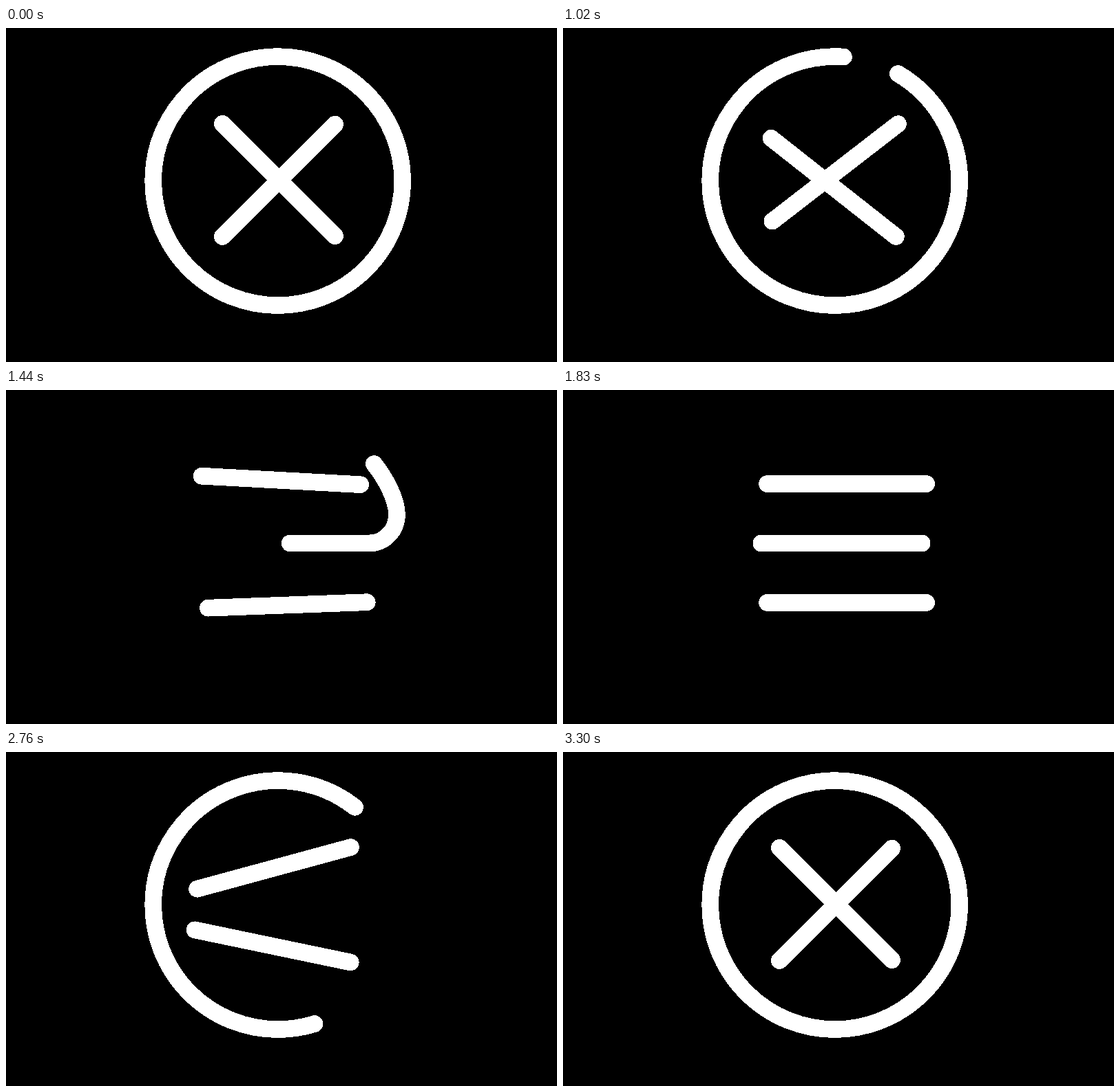
An HTML page without scripts that plays this animation: 800x486 px, repeating every 3.75 s.

```html
<!DOCTYPE html>
<html lang="en">
<head>
<meta charset="utf-8">
<title>Menu and close button</title>
<style>
  /* Both ends of the visible stroke, measured along the outline path. */
  @property --head { syntax: "<length>"; inherits: false; initial-value: 1710px; }
  @property --tail { syntax: "<length>"; inherits: false; initial-value: 571px; }

  html, body { margin: 0; width: 100%; height: 100%; overflow: hidden; background: #000; }
  svg { display: block; width: 100vw; height: 100vh; }
  path {
    fill: none;
    stroke: #fff;
    stroke-width: 24.7px;
    stroke-linecap: round;
    shape-rendering: crispEdges;
  }

  /* Opening is closing played backwards, so one half-loop alternates. */
  .outline, .bar {
    animation-duration: 1875ms;
    animation-delay: -3615ms;
    animation-iteration-count: infinite;
    animation-direction: alternate;
    animation-timing-function: linear;
  }
  .outline {
    animation-name: head, tail;
    stroke-dasharray: calc(var(--head) - var(--tail)) 3000px;
    stroke-dashoffset: calc(0px - var(--tail));
  }
  .top { animation-name: top-slide, top-turn; }
  .bottom { animation-name: bottom-slide, bottom-turn; }

  @keyframes head {
    0% { --head: 1710px; }
    31.2% { --head: 1710px; animation-timing-function: cubic-bezier(.5, 0, .8, .37); }
    56.8% { --head: 1358px; animation-timing-function: cubic-bezier(.33, .235, .67, .57); }
    64.8% { --head: 850px; }
    69.6% { --head: 416px; animation-timing-function: cubic-bezier(.1, .7, .35, 1); }
    83.4% { --head: 251px; animation-timing-function: cubic-bezier(.33, 0, .67, .33); }
    92.6%, 100% { --head: 264.8px; }
  }
  @keyframes tail {
    0% { --tail: 571px; }
    31.2% { --tail: 571px; animation-timing-function: cubic-bezier(.6, 0, .9, .4); }
    56.8% { --tail: 512px; animation-timing-function: cubic-bezier(.33, .18, .67, .58); }
    69.6% { --tail: 152px; animation-timing-function: cubic-bezier(.2, .65, .45, 1); }
    83.4% { --tail: 13.6px; animation-timing-function: cubic-bezier(.33, 0, .67, .33); }
    92.6%, 100% { --tail: 34.5px; }
  }

  @keyframes top-slide {
    0% { translate: 477.6px 140.2px; }
    31.2% { translate: 477.6px 140.2px; animation-timing-function: cubic-bezier(.4, 0, .75, .65); }
    56.8% { translate: 497px 139px; }
    60% { translate: 500.5px 138.6px; }
    69.6% { translate: 514.7px 137.7px; animation-timing-function: cubic-bezier(.33, .4, .6, 1); }
    79.2%, 100% { translate: 527.6px 136.6px; }
  }
  @keyframes top-turn {
    0% { rotate: -45deg; }
    31.2% { rotate: -45deg; animation-timing-function: cubic-bezier(.5, 0, .8, .46); }
    56.8% { rotate: -22deg; }
    60% { rotate: -15.1deg; animation-timing-function: cubic-bezier(.33, .4, .6, 1); }
    69.6% { rotate: 3.1deg; animation-timing-function: ease-in-out; }
    79.2%, 100% { rotate: 0deg; }
  }
  @keyframes bottom-slide {
    0% { translate: 477.6px 302.7px; }
    31.2% { translate: 477.6px 302.7px; animation-timing-function: cubic-bezier(.5, 0, .75, .5); }
    56.8% { translate: 494px 304.9px; }
    60% { translate: 500.3px 306px; }
    69.6% { translate: 524.2px 308.7px; animation-timing-function: cubic-bezier(.2, .7, .5, 1); }
    79.2%, 100% { translate: 527.6px 309.4px; }
  }
  @keyframes bottom-turn {
    0% { rotate: 45deg; }
    31.2% { rotate: 45deg; animation-timing-function: cubic-bezier(.5, 0, .8, .4); }
    56.8% { rotate: 22deg; }
    60% { rotate: 11.6deg; animation-timing-function: cubic-bezier(.25, .5, .6, 1); }
    69.6% { rotate: -2.1deg; animation-timing-function: ease-in-out; }
    79.2%, 100% { rotate: 0deg; }
  }
</style>
</head>
<body>
<svg viewBox="0 0 800 486">
  <!-- Middle bar, hook up to the ring, then once around it. -->
  <path class="outline" d="M262 223 H527
    C550 223 567.5 204 567.5 181
    C567.5 158 549.5 126 533.35 106.25
    A181 181 0 0 0 213.7 222.6
    A181 181 0 0 0 575.7 222.6
    A181 181 0 0 0 394.7 41.6"/>
  <path class="bar top" d="M0 0 H-231"/>
  <path class="bar bottom" d="M0 0 H-231"/>
</svg>
</body>
</html>
```
